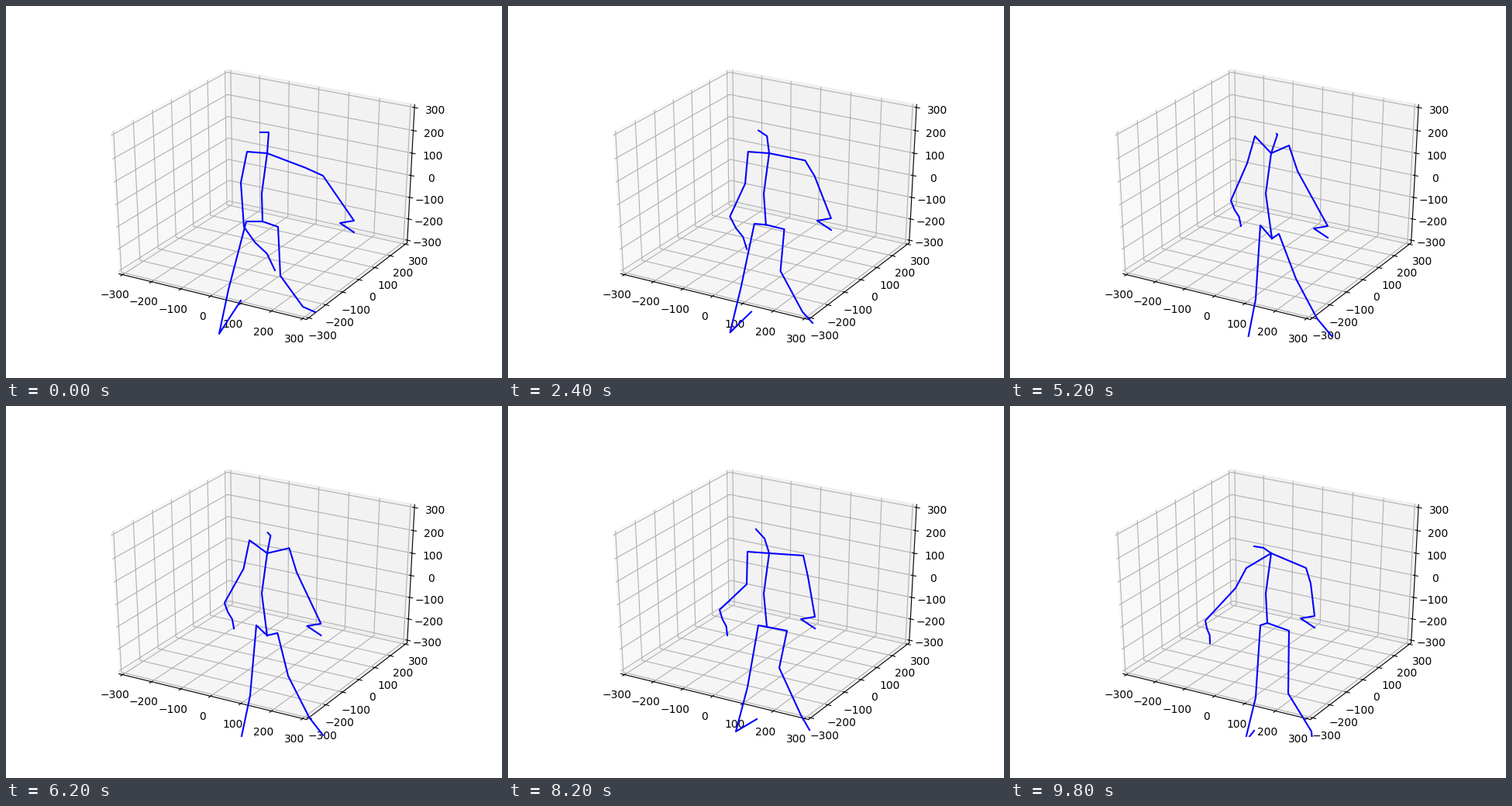
Recreate the animation shown at these times as a matplotlib script. Size 640 by 480 pixels, loop 10000 ms.

```python
import numpy as np
import matplotlib.pyplot as plt
from matplotlib.animation import FuncAnimation
from matplotlib.lines import Line2D
from matplotlib.transforms import Affine2D

W, H, DPI = 640, 480, 100
FRAMES, INTERVAL = 50, 200


def ease(frame, start, end):
    t = np.clip((frame - start) / (end - start), 0, 1)
    return t * t * (3 - 2 * t)


def gestures(frame):
    """Strength of the reach, the turn and the closing lean."""
    return (1 - ease(frame, 4, 18),
            ease(frame, 18, 26) - ease(frame, 26, 41),
            ease(frame, 41, 49))


def skeleton(frame):
    """Joint chains as complex stage points x + iy, y pointing down."""
    weights = gestures(frame)

    def joint(rest, *extremes):
        # Move from the standing place towards each gesture's extreme.
        p = complex(*rest)
        return p + sum(w * (complex(*e) - p) for w, e in zip(weights, extremes))

    neck, chest = 337 + 190j, 330 + 242j
    pelvis = joint((334, 285), (331, 278), (338, 300), (332, 280))
    head = joint((331, 171), (339, 163), (345, 166), (327, 183))
    nose = joint((320, 159), (328, 163), (344, 165), (315, 181))

    wrist_a = joint((273, 263), (307, 285), (285, 251), (252, 277))
    tip_a = joint((283, 296), (347, 341), (298, 284), (258, 306))
    hand_a = [wrist_a + (tip_a - wrist_a) * s for s in (0.36, 0.66 - 0.06j, 1)]
    arm_a = [joint((309, 188), (311, 188), (316, 168), (305, 209)),
             joint((308, 230), (303, 228), (306, 203), (291, 235)),
             wrist_a] + hand_a

    wrist_b = joint((396, 272), (449, 277), (410, 284), (393, 271))
    arm_b = [joint((381, 193), (387, 209), (360, 180), (382, 209)),
             joint((387, 220), (409, 219), (371, 213), (388, 229)),
             wrist_b, wrist_b - 18 + 3j, wrist_b - 9 + 9j, wrist_b + 15j]

    leg_a = [joint((323, 283), (310, 278)),
             joint((309, 363), (287, 366), (317, 378), (317, 376)),
             joint((294, 420), (275, 423), (305, 440), (303, 434)),
             joint((321, 404), (303, 380), (322, 436), (315, 419))]
    leg_b = [joint((360, 290), (351, 285), (347, 294)),
             joint((350, 338), (354, 348), (369, 352), (359, 371)),
             joint((378, 399), (383, 388), (396, 403), (389, 420)),
             joint((389, 418), (399, 395), (416, 427), (390, 432))]

    return ([pelvis, chest, neck, head, nose], [neck] + arm_a, [neck] + arm_b,
            [pelvis] + leg_a, [pelvis] + leg_b)


fig = plt.figure(figsize=(W / DPI, H / DPI), dpi=DPI)
ax = fig.add_subplot(projection="3d")
ax.apply_aspect = lambda position=None: None   # fill the whole subplot box
ax.set_box_aspect((1, 1, 1), zoom=np.sqrt(3) / 1.8294640721620434)
ax.view_init(elev=30, azim=-60)
ticks = range(-300, 301, 100)
ax.set(xticks=ticks, yticks=ticks, zticks=ticks)
limits = (-312.5, 312.5)
ax.set(xlim=limits, ylim=limits, zlim=limits)

# Stage pixels with y pointing down
stage = Affine2D().scale(1 / W, -1 / H).translate(0, 1) + fig.transFigure
lines = [ax.add_artist(Line2D([], [], color="b", lw=1.5, transform=stage))
         for _ in skeleton(0)]


def update(frame):
    for line, chain in zip(lines, skeleton(frame)):
        line.set_data(np.real(chain), np.imag(chain))
    return lines


anim = FuncAnimation(fig, update, frames=FRAMES, interval=INTERVAL,
                     init_func=lambda: update(0), repeat=True,
                     repeat_delay=0, blit=False)
plt.show()
```
